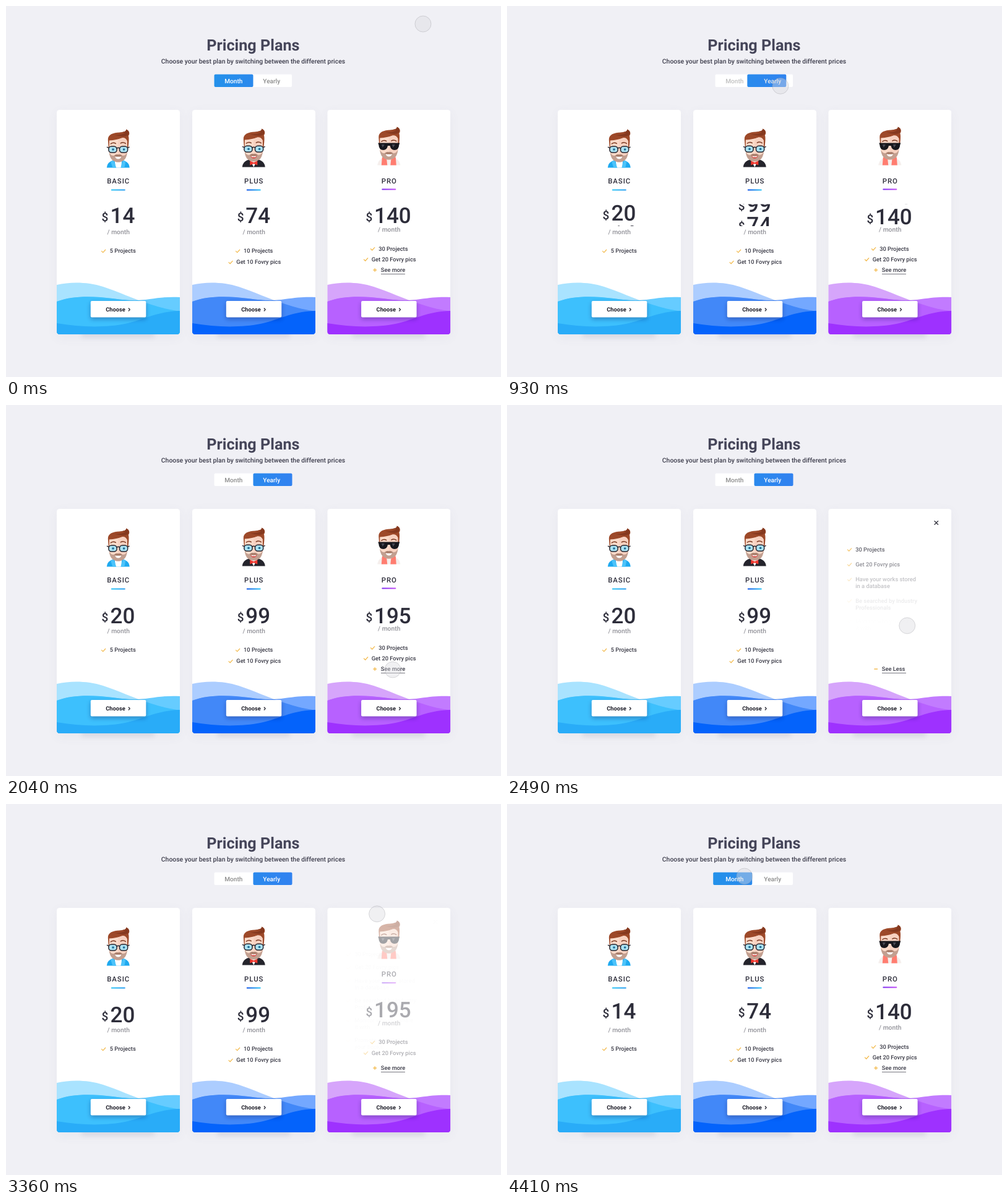
Write an HTML page that moves like this. It is 800x600 px and loops after 4440 ms.

```html
<!DOCTYPE html>
<html lang="en">
<head>
<meta charset="utf-8">
<title>Pricing Plans</title>
<style>
  html, body { margin: 0; width: 100%; height: 100%; overflow: hidden; background: #f0f0f5; }
  svg { display: block; width: 800px; height: 600px; }
  text { font-family: Roboto, sans-serif; font-weight: 500; text-rendering: geometricPrecision; }
  .bold { font-weight: 700; }
</style>
</head>
<body>
<script>
const LOOP = 4440, INK = '#2d2d3a', BODY = '#3a3a46', GOLD = '#f3bc52';

const plans = [
  { x: 82, cx: 181.3, dy: 0, name: 'BASIC', old: 14, now: 20, px: 154.6, nx: 168.5,
    bar: ['#2cc6f6', '#2a9cf0'], wave: ['#a9e3ff', '#66ccff', '#3dc0fd', '#29acf8'],
    list: [[154, 167.7, 399.2, '5 Projects']] },
  { x: 301, cx: 400.3, dy: 0, name: 'PLUS', old: 74, now: 99, px: 373.8, nx: 387.3,
    bar: ['#0b50e6', '#2cc6f6'], wave: ['#accdff', '#74a8ff', '#4288f8', '#0463fb'],
    list: [[371, 384, 399.2, '10 Projects'], [359.5, 372.3, 417.4, 'Get 10 Fovry pics']] },
  { x: 519.3, cx: 618.8, dy: -.5, name: 'PRO', old: 140, now: 195, px: 581.4, nx: 595,
    bar: ['#7a2cf0', '#c44cf5'], wave: ['#d6a5fb', '#c27bff', '#b761ff', '#9e31ff'],
    list: [[589, 602.2, 395.6, '30 Projects'], [578, 590.7, 412.8, 'Get 20 Fovry pics']] }
];

const features = [
  [234.4, '30 Projects'],
  [255.6, 'Get 20 Fovry pics'],
  [276.8, 'Have your works stored', 'in a database'],
  [308.9, 'Be searched by Industry', 'Professionals'],
  [341, 'Monitor who you share', 'it with'],
  [373.2, 'Promote and share', 'your books']
];

const text = (x, y, size, str, fill = BODY, extra = '') =>
  `<text x="${x}" y="${y}" font-size="${size}" fill="${fill}" ${extra}>${str}</text>`;
const mid = 'text-anchor="middle"', bold = 'class="bold"';
const path = (d, fill, extra = '') => `<path d="${d}" fill="${fill}" ${extra}/>`;
const line = (d, color, w) =>
  path(d, 'none', `stroke="${color}" stroke-width="${w}" stroke-linecap="round" stroke-linejoin="round"`);
const tick = (x, y) => line(`M${x + .5} ${y - 2.8}l2.2 2.2 4-4.4`, GOLD, 1.3);
const item = ([cx, tx, y, str]) => tick(cx, y) + text(tx, y, 9.3, str);

function body(i) {
  const torso = 'M-18.5 63Q-18 54 -8 51H8Q18 54 18.5 63Z';
  if (i === 0) return path(torso, '#1ea9f0') + path('M-6 50H6L5 63H-4Z', '#fff')
    + path('M-8 50L-3 63H-9L-12 54ZM8 50L4 63H10L12 54Z', '#4cc3fa');
  if (i === 1) return path(torso, '#24242c') + path('M-7 50H7L0 63Z', '#fff');
  return path(torso, '#f5efed') + path('M-12 63L-11 50L-4 49.5L-2.5 63ZM12 63L11 50L4 49.5L2.5 63Z', '#ff7d70');
}

function glasses(i) {
  if (i === 2) return path('M-17.5 27H17.5L16.5 30Q16 38.5 9 38.5Q3 38.5 1.8 31.5H-1.8Q-3 38.5 -9 38.5Q-16 38.5 -16.5 30Z', '#17171d')
    + path('M-12 29.5h5l-3 5ZM5 29.5h5l-3 5Z', '#4a4a54');
  return [-8.8, 8.8].map(x =>
    `<rect x="${x - 6.6}" y="28.6" width="13.2" height="10" rx="4.5" fill="#abe2f3" stroke="#25252f" stroke-width="1.5"/>
     <circle cx="${x + .5}" cy="33.6" r="1.8" fill="#1d6b94"/>`).join('')
    + line('M-2.2 31.5Q0 30 2.2 31.5M-17.8 30L-15.4 31M17.8 30L15.4 31', '#25252f', 1.5);
}

function avatar(i, cx) {
  const top = [198.4, 197.6, 194.6][i];
  return `<g transform="translate(${cx} ${top})">${body(i)}
    <rect x="-6" y="44" width="12" height="10" rx="4" fill="#eec2ad"/>
    ${path('M-15.5 32L-16.5 18C-17 9 -8 6.5 2 6C9 5.5 13 4.5 13 1C18 3 19.5 8 16.5 11.5C18 15 17 24 16 32Z', '#9d4929')}
    ${path('M2 6C9 5.5 13 4.5 13 1C18 3 19 8 15 11Q10 14 -6 10Q8 10 12 6Z', '#85391f')}
    ${path('M-14.5 40V19Q-2 18 6 15Q12 14 14.5 20V40Q12 50 0 51Q-12 50 -14.5 40Z', '#fbdac9')}
    ${path('M0 17L6 15Q12 14 14.5 20V40Q12 50 0 51Z', '#f7d1c0')}
    ${path('M-14.5 38Q-13.5 53.5 0 54Q13.5 53.5 14.5 38Q12 44 7 43.5Q3 40.5 0 41.5Q-3 40.5 -7 43.5Q-12 44 -14.5 38Z', '#c29f90')}
    ${path('M-6.5 44Q-3 41 0 42.4Q3 41 6.5 44Q3 45 0 44.5Q-3 45 -6.500 44Z', '#a67a67')}
    ${path('M-5 45Q0 46 5 45Q4 49 0 49Q-4 49 -5 45Z', i === 1 ? '#d8423c' : '#fff')}
    ${i === 1 ? path('M-4 45.2Q0 46 4 45.2L3 46.8H-3Z', '#fff') : ''}
    ${line('M-12 24.5Q-8 21.5 -4 24M4 23.5Q8 21 12 24', '#7a3820', 1.4)}
    ${glasses(i)}
    ${i === 1 ? path('M0 55.500L-6 53V60L0 57.500L6 60V53Z', '#f0382f') : ''}
  </g>`;
}

const price = (p, value) => text(p.px, 350, 19, '$', INK) + text(p.nx, 352.5, 35, value, INK);

function details(p, i) {
  const unitY = i === 2 ? 364.8 : 368.8;
  return avatar(i, p.cx)
    + text(p.cx + .4, 287 + p.dy, 11.4, p.name, INK, mid + ' letter-spacing=".9"')
    + `<rect x="${p.cx - 11.5}" y="${296.4 + p.dy * 2}" width="23" height="2" rx="1" fill="url(#bar${i})"/>`
    + `<g clip-path="url(#slot)"><g id="old${i}">${price(p, p.old)}</g><g id="now${i}">${price(p, p.now)}</g></g>`
    + text(p.cx + .4, unitY, 10.3, '/ month', '#929299', mid)
    + p.list.map(item).join('');
}

function card(p, i) {
  const [light, right, blend, dark] = p.wave;
  return `<rect x="${p.x}" y="172" width="199" height="365" rx="4" fill="#505078" opacity=".05" filter="url(#soft)"/>
    <rect x="${p.x + 40}" y="500" width="118" height="37" fill="#505070" opacity=".1" filter="url(#near)"/>
    <g transform="translate(${p.x} 168)" clip-path="url(#card)">
      <rect width="199" height="363" fill="#fff"/>
      <use href="#w1" fill="${light}"/><use href="#w2" fill="${right}"/>
      <g clip-path="url(#under)"><use href="#w1" fill="${blend}"/></g>
      <use href="#w3" fill="${dark}"/>
    </g>
    <g id="front${i}">${details(p, i)}</g>
    <g transform="translate(${p.x + 54.8} 477)">
      <rect y="3" width="89.5" height="26.5" rx="2" fill="#101050" opacity=".32" filter="url(#near)"/>
      <rect width="89.5" height="26.5" rx="2" fill="#fff"/>
      ${text(24.5, 16.7, 9.25, 'Choose', '#1d1d28', bold)}
      ${line('M61.5 12l1.9 2-1.9 2', '#1d1d28', 1.2)}
    </g>`;
}

const feature = ([y, ...rows], i) => `<g id="feat${i}">${tick(550, y)}${
  rows.map((r, k) => text(563.2, y + k * 11, 9.3, r)).join('')}</g>`;

document.body.innerHTML = `<svg viewBox="0 0 800 600" xmlns="http://www.w3.org/2000/svg">
  <defs>
    <filter id="soft" x="-30%" y="-30%" width="160%" height="160%"><feGaussianBlur stdDeviation="9"/></filter>
    <filter id="near" x="-30%" y="-60%" width="160%" height="220%"><feGaussianBlur stdDeviation="3.5"/></filter>
    <clipPath id="card"><rect width="199" height="363" rx="4.5"/></clipPath>
    <clipPath id="slot"><rect x="82" y="320.5" width="637" height="35.5"/></clipPath>
    <path id="w1" d="M0 283C22 278 50 278 75 286S122 305 150 314S185 323 199 326V363H0Z"/>
    <path id="w2" d="M0 310C25 300 60 301 90 305S130 309 150 306S185 302 199 303V363H0Z"/>
    <path id="w3" d="M0 345C40 352 80 352 110 346S160 326 199 325V363H0Z"/>
    <clipPath id="under"><use href="#w2"/></clipPath>
    <linearGradient id="tab" gradientUnits="userSpaceOnUse" x1="336" x2="462" y1="0" y2="0">
      <stop stop-color="#2491ea"/><stop offset="1" stop-color="#3182f0"/></linearGradient>
    ${plans.map((p, i) => `<linearGradient id="bar${i}"><stop stop-color="${p.bar[0]}"/>
      <stop offset="1" stop-color="${p.bar[1]}"/></linearGradient>`).join('')}
  </defs>
  <rect width="800" height="600" fill="#f0f0f5"/>
  ${text(399.4, 71.8, 25.2, 'Pricing Plans', '#454559', mid + ' ' + bold)}
  ${text(399.5, 93.3, 10.4, 'Choose your best plan by switching between the different prices', '#3d3d4c', mid)}
  <rect x="336.5" y="110.5" width="125.5" height="20.5" rx="2" fill="#fff"/>
  <rect id="thumb" y="110.5" width="63" height="20.5" rx="2" fill="url(#tab)"/>
  ${text(367.8, 124.8, 10.1, 'Month', '#fff', mid + ' id="month"')}
  ${text(429.2, 124.8, 10.1, 'Yearly', '#999', mid + ' id="yearly"')}
  ${plans.map(card).join('')}
  ${features.map(feature).join('')}
  <g id="close">${line('M691 187.7l5.6 5.6m0-5.6l-5.6 5.6', '#33333e', 1.3)}</g>
  ${line('M593.8 427h4.8', GOLD, 1.3)}
  <g id="plus">${line('M596.2 424.6v4.8', GOLD, 1.3)}</g>
  <g id="more">${text(605.8, 430.2, 9.3, 'See more')}</g>
  <g id="less">${text(605.8, 430.2, 9.3, 'See Less')}</g>
  <rect x="606" y="433" width="39" height="1" fill="#77777f"/>
  <circle id="cursor" r="13" fill="#dcdce0" fill-opacity=".42" stroke="#85858c" stroke-opacity=".32" stroke-width=".9"/>
</svg>`;

const $ = id => document.getElementById(id);
const clamp = v => Math.min(1, Math.max(0, v));
const ease = u => (1 - Math.cos(Math.PI * clamp(u))) / 2;
const back = (u, s) => { const v = clamp(u) - 1; return 1 + (s + 1) * v ** 3 + s * v * v; };
const shift = (id, y) => $(id).setAttribute('transform', `translate(0 ${y.toFixed(2)})`);
const fade = (id, o) => $(id).setAttribute('opacity', o.toFixed(3));

// Switch from month to yearly and back, with overshoot both ways.
const ROLL = 430;
const roll = (t, there, again, s) => back((t - there) / ROLL, s) - back((t - again) / ROLL, s);
const grey = (from, to, k) => {
  const c = Math.round(from + (to - from) * clamp(k));
  return `rgb(${c},${c},${c})`;
};
const starts = [[821, 4126], [885, 4178], [924, 4229]];

const trail = [
  [0, 674, 29], [700, 427, 122], [1350, 480, 148], [1980, 625, 428], [2180, 625, 428],
  [3000, 694, 202], [3120, 694, 202], [3810, 347, 113], [LOOP, 384, 117]
];

function moveCursor(t) {
  const k = trail.findIndex(s => s[0] > t);
  const [t0, x0, y0] = trail[k - 1], [t1, x1, y1] = trail[k];
  const e = ease((t - t0) / (t1 - t0));
  $('cursor').setAttribute('cx', x0 + (x1 - x0) * e);
  $('cursor').setAttribute('cy', y0 + (y1 - y0) * e);
}

function draw(t) {
  const tab = roll(t, 805, 4126, 1.2);
  $('thumb').setAttribute('x', 336.5 + 63 * tab);
  $('month').setAttribute('fill', grey(255, 140, clamp(tab) ** 3));
  $('yearly').setAttribute('fill', grey(140, 255, tab));

  starts.forEach(([there, again], i) => {
    const p = roll(t, there, again, 1.8);
    shift('old' + i, 35 * p - 2);
    shift('now' + i, 35 * (p - 1));
  });

  const open = (delay, span) => ease((t - 2130 - delay) / span) - ease((t - 3080) / 300);
  const out = ease((t - 2130) / 250) - ease((t - 3230) / 300);
  fade('front2', 1 - out);
  shift('front2', -12 * out);
  features.forEach((_, i) => {
    const o = open(150 + i * 50, 300);
    fade('feat' + i, o);
    shift('feat' + i, 12 * (1 - o));
  });
  const swap = open(100, 250);
  fade('close', swap);
  fade('less', swap);
  fade('more', 1 - swap);
  fade('plus', 1 - swap);
  moveCursor(t);
}

const origin = performance.now();
function play() {
  draw((performance.now() - origin) % LOOP);
  requestAnimationFrame(play);
}
play();
</script>
</body>
</html>
```
